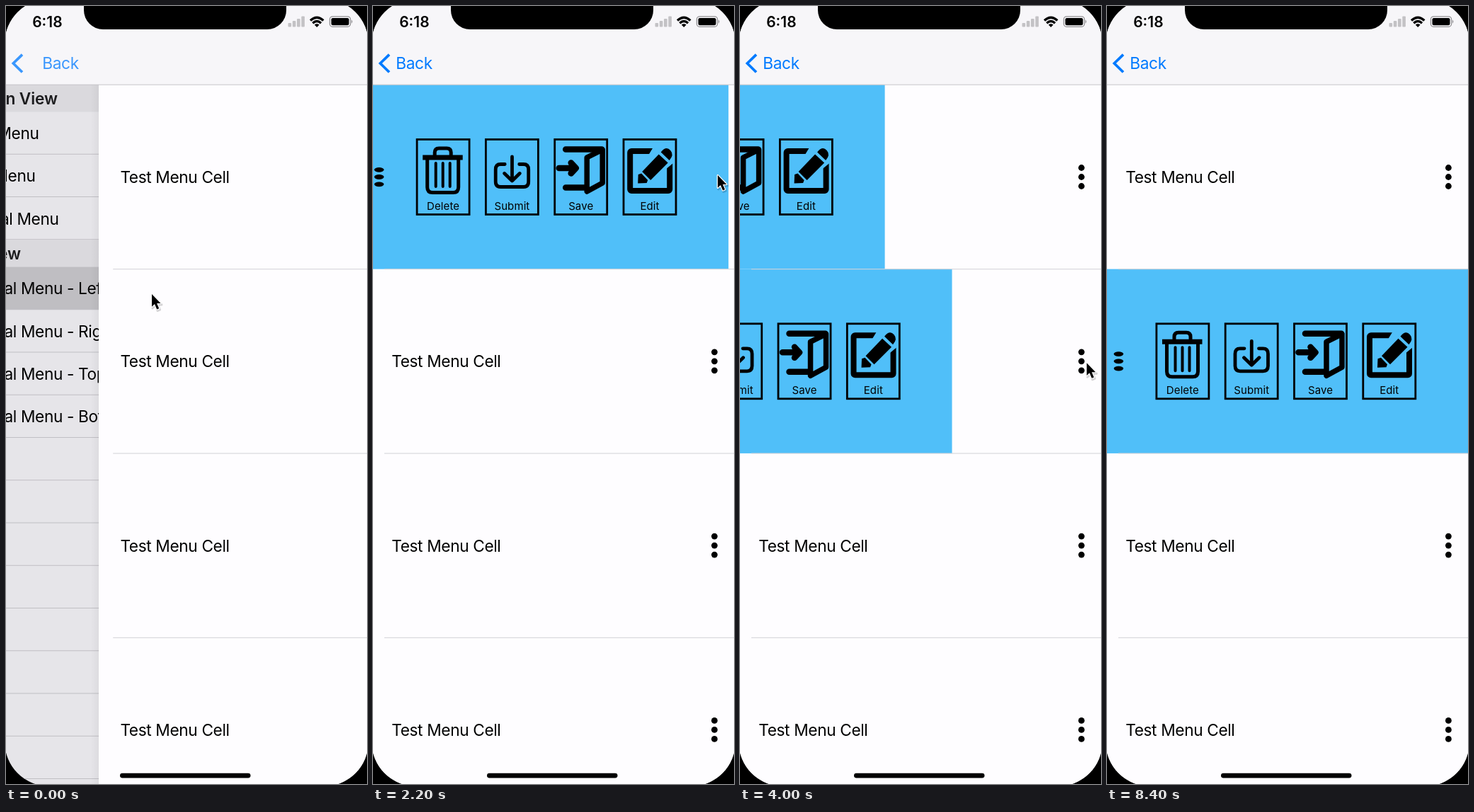
These frames come from a looping animation (510x1099 px, 8500 ms). An HTML page:

```html
<!DOCTYPE html>
<html lang="en">
<head>
<meta charset="utf-8">
<title>Menu cells</title>
<style>
  html, body { margin: 0; width: 100%; height: 100%; overflow: hidden; background: #000; }
  svg { display: block; width: 510px; height: 1099px; }
  text { font: 22.7px Inter, Roboto, sans-serif; letter-spacing: -.38px; }
  .head { font-weight: 600; fill: #1c1c1e; letter-spacing: -.1px; }
  .label { font-size: 15px; letter-spacing: .1px; text-anchor: middle; }
  .time { font-size: 21px; font-weight: 600; letter-spacing: 0; }
  .line { fill: none; stroke: #000; stroke-linecap: round; stroke-linejoin: round; }
</style>
</head>
<body>
<svg viewBox="0 0 510 1099">
  <defs>
    <clipPath id="screen"><rect x="-1.7" y="-9.5" width="513.5" height="1111.5" rx="62"/></clipPath>
    <linearGradient id="shade">
      <stop offset="0" stop-opacity="0"/><stop offset="1" stop-opacity=".04"/>
    </linearGradient>
    <g id="menu">
      <rect y="111.3" width="510" height="260.3" fill="#50bff9"/>
      <ellipse cx="16.4" cy="231.3" rx="6.8" ry="3.4"/>
      <ellipse cx="16.4" cy="241.5" rx="6.8" ry="3.4"/>
      <ellipse cx="16.4" cy="251.8" rx="6.8" ry="3.4"/>
      <g id="boxes"></g>
      <!-- bin -->
      <path d="M78 210.5H134.5V217.5H78Z"/>
      <path class="line" stroke-width="5" d="M95 211V207Q95 201 101 201H112Q118 201 118 207V211M84.5 216V256Q84.5 263.5 92 263.5H121Q128.5 263.5 128.5 256V216"/>
      <path class="line" stroke-width="4" stroke-linecap="butt" d="M96.5 222V255M106.5 222V255M116.5 222V255"/>
      <!-- tray -->
      <path class="line" stroke-width="4.8" d="M194 223.5H188Q181 223.5 181 231V248Q181 255.5 188 255.5H220.5Q227.5 255.5 227.5 248V231Q227.5 223.5 220.5 223.5H214.5M204.3 213V246M193.5 236.5L204.3 247L215 236.5"/>
      <!-- door -->
      <path class="line" stroke-width="8.5" d="M280 202.5H331M280 256.5H308M270.5 229H293M287.5 221.5L294.5 229L287.5 236.5"/>
      <path class="line" stroke-width="7.5" d="M310 214L332 203V250L310 262Z"/>
      <!-- pencil -->
      <rect class="line" x="371" y="205" width="56" height="56" rx="2" stroke-width="8"/>
      <path fill="#50bff9" d="M404 199L393 217L380 235L379 254L398 252L416 235L433 221V198Z"/>
      <path d="M382 250.5L382.5 238L387 236.5L396 246L394.5 250Z"/>
      <path d="M388 234L411.5 209.5L424.5 221.5L400 246Z"/>
      <path d="M414.5 206.5Q422 197 428 204Q433.5 210 426.5 218Z"/>
    </g>
  </defs>
  <g clip-path="url(#screen)">
    <rect width="510" height="1099" fill="#e6e5e9"/>
    <g id="list"></g>
    <g id="page">
      <rect x="-12" y="111" width="12" height="988" fill="url(#shade)"/>
      <rect y="111" width="524" height="988" fill="#fefdff"/>
    </g>
    <g id="cells"></g>
    <use id="menu0" href="#menu"/>
    <use id="menu1" href="#menu"/>
    <g id="rules"></g>
    <rect width="510" height="111" fill="#f7f6f9"/>
    <rect y="110.7" width="510" height="1" fill="#c6c5c9"/>
    <g id="back" fill="#007aff">
      <path d="M23 68.7L10.3 81L23 93.5" fill="none" stroke="#007aff" stroke-width="3.7"/>
      <text id="backText" y="89.3">Back</text>
    </g>
    <rect x="110" y="-40" width="286" height="73" rx="27"/>
    <text class="time" x="37.2" y="29.5">6:18</text>
    <g fill="#c3c2c5">
      <rect x="398.5" y="24" width="4.6" height="5.5" rx="1"/>
      <rect x="404.8" y="21" width="4.6" height="8.5" rx="1"/>
      <rect x="411" y="18" width="4.6" height="11.5" rx="1"/>
      <rect x="417.3" y="14.5" width="4.6" height="15" rx="1"/>
    </g>
    <path d="M430 20.5Q439.2 12 448.4 20.5M433.3 24.3Q439.2 18.8 445.1 24.3" fill="none" stroke="#000" stroke-width="3.3"/>
    <path d="M435.8 26.5Q439.2 23.8 442.6 26.5L439.2 30Z"/>
    <rect x="457.4" y="14.9" width="29.2" height="14.4" rx="4" fill="none" stroke="#929194" stroke-width="1.3"/>
    <rect x="459.5" y="17" width="25" height="10.2" rx="2.2"/>
    <path d="M488 19.5Q490.8 22 488 24.7Z" fill="#929194"/>
    <rect x="161" y="1083.7" width="184.5" height="6.8" rx="3.4"/>
  </g>
  <g id="cursor" stroke-linejoin="round">
    <path d="M1 2V20L5 16L8 23.5L11.5 22L8.5 15H14Z" opacity=".16" stroke="#000" stroke-width="3"/>
    <path d="M0 0V17.8L4 14L7.2 21.5L10.2 20.2L7.1 12.9H12.5Z" stroke="#fff" stroke-width="2.4" paint-order="stroke"/>
  </g>
</svg>
<script>
const $ = id => document.getElementById(id);
const add = (id, markup) => $(id).insertAdjacentHTML('beforeend', markup);
const PITCH = 260.3, ROW = 60.25;

['Delete', 'Submit', 'Save', 'Edit'].forEach((name, i) => {
  const x = 106.9 + 97.3 * i;
  add('boxes', `<rect class="line" style="stroke-linejoin:miter" x="${x - 37}" y="188.5" width="74" height="106" stroke-width="2.8"/>
    <text class="label" x="${x}" y="288">${name}</text>`);
});

for (let i = 0; i < 4; i++) {
  const y = 241.5 + PITCH * i;
  add('cells', `<text x="26.2" y="${y + 8.6}">Test Menu Cell</text>` +
    [-13, 0, 13].map(d => `<circle cx="482.4" cy="${y + d}" r="4.4"/>`).join(''));
  if (i < 3) add('rules', `<rect x="16" y="${y + 129.7}" width="510" height="1" fill="#d2d1d6"/>`);
}

// Previous screen: two titled groups, then empty rows
const header = (y, name, end) => add('list',
  `<rect x="-20" y="${y}" width="180" height="38.5" fill="#dad9dd"/>
   <text class="head" x="${end}" y="${y + 28}" text-anchor="end">${name}</text>`);
const rule = y => add('list', `<rect x="-20" y="${y - .5}" width="180" height="1" fill="#c0bfc4"/>`);
[['Left Menu', 46.5], ['Right Menu', 41.5], ['Horizontal Menu', 74.5]].forEach(([name, end], i) => {
  add('list', `<text x="${end}" y="${188 + ROW * i}" text-anchor="end">${name}</text>`);
  rule(149 + ROW * (i + 1));
});
header(111, 'Collection View', 73);
header(330, 'Table View', 21);
add('list', `<rect x="-20" y="368.5" width="180" height="${ROW}" fill="#bfbec2"/>`);
['Left', 'Right', 'Top', 'Bottom'].forEach((side, i) =>
  add('list', `<text x="-2.5" y="${407.3 + ROW * i}">al Menu - ${side}</text>`));
for (let i = 1; i <= 12; i++) rule(368.5 + ROW * i);

const clamp = v => Math.min(1, Math.max(0, v));

// Ease-in-out, the curve (.42, 0, .58, 1)
function ease(p) {
  let lo = 0, hi = 1;
  for (let i = 0; i < 24; i++) {
    const s = (lo + hi) / 2, r = 1 - s;
    if (1.26 * s * r * r + 1.74 * s * s * r + s * s * s < p) lo = s; else hi = s;
  }
  return lo * lo * (3 - 2 * lo);
}
const slide = (t, start) => ease(clamp((t - start) / 1020));
const opening = (t, start) => -510 * (1 - slide(t, start));
const closing = (t, start) => -520 * slide(t, start);

// Pointer stops: time, x, y
const stops = [[0, 206, 407], [200, 206, 407], [900, 488.5, 246], [1000, 488.5, 246],
  [1200, 487, 239], [2400, 487, 239], [3200, 489.8, 505], [4400, 489.8, 504], [4800, 522, 504], [8500, 522, 504]];
function pointer(t) {
  const i = stops.findIndex((s, k) => k && t <= s[0]);
  const [a, b] = [stops[i - 1], stops[i]];
  const p = (t - a[0]) / (b[0] - a[0]), q = p * p * (3 - 2 * p);
  return [a[1] + (b[1] - a[1]) * q, a[2] + (b[2] - a[2]) * q];
}

const move = (id, x, y = 0) => $(id).setAttribute('transform', `translate(${x} ${y})`);

function draw(t) {
  let push = 131 * Math.exp(-t / 90);
  if (push < .5) push = 0;
  const left = push / 131;
  move('list', -39 * (1 - left));
  $('list').style.display = push ? '' : 'none';
  move('page', push);
  move('cells', push * 1.032);
  move('rules', push * 1.032);
  $('backText').setAttribute('x', 32.3 + 19 * left);
  $('back').setAttribute('opacity', 1 - .24 * left);

  move('menu0', opening(t, 1270) + closing(t, 3438));
  move('menu1', opening(t, 3438), PITCH);
  move('cursor', ...pointer(t));
}

const begin = performance.now();
function tick(now) {
  const t = Math.max(0, now - begin) % 8500;
  draw(Math.floor(t / 100) * 100);
  requestAnimationFrame(tick);
}
draw(0);
requestAnimationFrame(tick);
</script>
</body>
</html>
```
